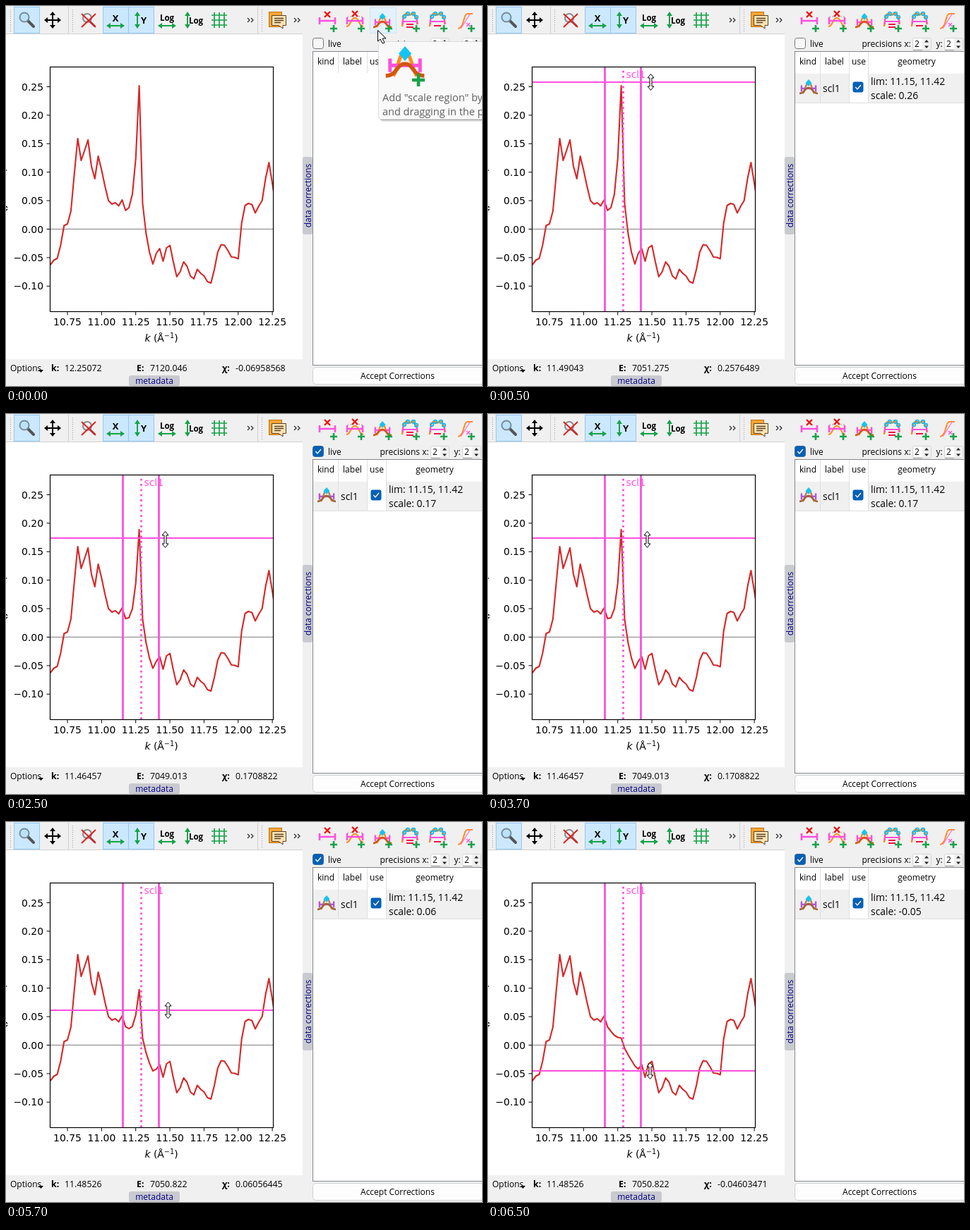
Animation, 674 px wide and 539 px high, one loop 8 s. Source, as an HTML page:

```html
<!DOCTYPE html>
<html>
<head>
<meta charset="utf-8">
<style>
  html, body { margin: 0; width: 100%; height: 100%; overflow: hidden; background: #f0f0f0; }
  svg { display: block; width: 674px; height: 539px; --bar: #ff50dc; --arch: #ff8c1a; --hump: #d2560f; }
  text { font-family: "Open Sans", sans-serif; white-space: pre; }
  .ui { font-size: 12px; }
  .status { font-size: 12.3px; }
  .big { font-size: 13.9px; }
  .tip { font-size: 14.5px; }
  .axis, .axis text { font-family: "DejaVu Sans", sans-serif; font-size: 13.9px; }
  .line { fill: none; }
  .muted { --bar: #b055d8; --arch: #c08048; --hump: #a5622f; }
</style>
</head>
<body>
<svg viewBox="0 0 674 539">
  <defs>
    <clipPath id="axes"><rect x="62" y="86" width="316" height="347"/></clipPath>
    <path id="plus" d="M-5 0H5M0 -5V5" stroke="#17a34a" stroke-width="2.6"/>
    <path id="cross" d="M-4 -4L4 4M4 -4L-4 4" stroke="#f01010" stroke-width="2.4"/>
    <path id="span" d="M-11 -5V5M11 -5V5M-11 0H11" stroke="var(--bar)" stroke-width="2.6"/>
    <g id="peak" class="line">
      <path d="M-8 9C-5 6 -4 -7 0 -7C4 -7 5 6 8 9" stroke="var(--arch)" stroke-width="2.4"/>
      <use href="#span" transform="translate(0 2) scale(.92)"/>
      <path d="M-13 9C-5 9 -6 1 0 1C6 1 5 9 13 9" stroke="var(--hump)" stroke-width="2.6"/>
      <path d="M0 -11L4.3 -6L0 -1L-4.3 -6Z" fill="#12c4f5"/>
    </g>
    <g id="arcs" class="line">
      <path d="M-11 10C-10 -4 -8 -9 -4 -8C-1 -7 0 -5 1 -7C4 -11 9 -8 11 7" stroke="#ff8c1a" stroke-width="2.4"/>
      <path d="M-10 -1V7M10 -1V7M-10 3H10" stroke="#ff50dc" stroke-width="2"/>
      <g stroke="#12b8ee" stroke-width="1.7">
        <circle cx="-8" cy="-4" r="2.3"/><circle cx="-3" cy="-8" r="2.3"/>
        <circle cx="5" cy="-8" r="2.3"/><circle cx="9" cy="-3" r="2.3"/>
      </g>
    </g>
    <path id="chev" class="line" d="M-4 -3L-1 0L-4 3M1 -3L4 0L1 3" stroke="#222" stroke-width="1.1"/>
    <g id="spin">
      <rect x=".5" y=".5" width="26" height="17" rx="2" fill="#fff" stroke="#d5d5d5"/>
      <rect x="14" y="1" width="12" height="16" fill="#f0f0f0"/>
      <path d="M1 17.5H14" stroke="#888"/>
      <path d="M17 6.5L20 3L23 6.5ZM17 11.5L20 15L23 11.5Z" fill="#222"/>
      <text class="ui" x="3" y="13">2</text>
    </g>
    <g id="tick">
      <rect x="-7.5" y="-7.5" width="15" height="15" rx="3" fill="#0560b6"/>
      <path class="line" d="M-3.7 0L-1 3L4 -3" stroke="#fff" stroke-width="1.3"/>
    </g>
  </defs>

  <!-- plot toolbar -->
  <rect width="420" height="501" fill="#fff"/>
  <rect width="420" height="40" fill="#f0f0f0"/>
  <path d="M0 39.5H420M88.5 1V39M356.5 1V39" stroke="#d0d0d0"/>
  <path d="M6.5 5V36M94.5 5V36M362.5 5V36" stroke="#999" stroke-dasharray="1 2"/>
  <g fill="#cce8ff" stroke="#90c8f6">
    <rect x="11.5" y="1.5" width="36" height="37"/>
    <rect x="137.5" y="1.5" width="36" height="37"/>
    <rect x="173.5" y="1.5" width="36" height="37"/>
  </g>
  <path d="M30 20L39 29" stroke="#555" stroke-width="4" stroke-linecap="round"/>
  <circle cx="26" cy="16" r="6.5" fill="#b9e2fb" stroke="#7b8b98" stroke-width="2"/>
  <path d="M56 20H76M66 10V30" stroke="#000" stroke-width="2"/>
  <path d="M54 20L59 16V24ZM78 20L73 16V24ZM66 8L62 13H70ZM66 32L62 27H70Z"/>
  <circle cx="115" cy="17" r="6" fill="#eef5fa" stroke="#888" stroke-width="2"/>
  <path d="M119 22L126 29" stroke="#666" stroke-width="3"/>
  <path d="M107 11L127 30M127 11L107 30" stroke="#e02020" stroke-width="2"/>
  <g stroke="#17a34a" stroke-width="2" fill="#17a34a">
    <path d="M146 28H164M186 13V27M219 28H237M257 13V27"/>
    <g stroke="none">
      <path d="M142 28L148 24V32ZM168 28L162 24V32ZM186 8L182 14H190ZM186 32L182 26H190Z"/>
      <path d="M215 28L221 24V32ZM241 28L235 24V32ZM257 8L253 14H261ZM257 32L253 26H261Z"/>
    </g>
    <path d="M291 13H313M291 20H313M291 27H313M295 9V31M302 9V31M309 9V31" stroke-width="1.7"/>
  </g>
  <g font-weight="700" text-anchor="middle">
    <text x="155" y="22" font-size="13">X</text>
    <text x="195" y="25" font-size="13">Y</text>
    <text x="228" y="21" font-size="11.5">Log</text>
    <text x="269" y="25" font-size="11.5">Log</text>
  </g>
  <use href="#chev" x="346" y="20"/>
  <use href="#chev" x="412" y="20"/>
  <rect x="372.5" y="8.5" width="18" height="21" fill="#f7a531" stroke="#c07418"/>
  <path d="M376.5 13.5H396.5V27.5H392V32L386 27.5H376.5Z" fill="#fde2b4" stroke="#5a4228"/>
  <path d="M380 17.5H393M380 20.5H393M380 23.5H389" stroke="#5a4228" stroke-width="1.3"/>

  <!-- chart -->
  <g clip-path="url(#axes)">
    <path d="M62 316.5H378" stroke="#a0a0a0" stroke-width="1.4"/>
    <polyline id="curve" class="line" stroke="#d62728" stroke-width="2.1" stroke-linejoin="round"/>
    <g class="roi" stroke="#ff50dc">
      <path d="M165.5 86V433M216.5 86V433" stroke-width="2.8"/>
      <path d="M191.5 433V86" stroke-width="2.8" stroke-dasharray="2.78 4.58"/>
      <path id="level" d="M62 0H378" stroke-width="2.1"/>
      <text class="axis" x="195.5" y="102" fill="#ff50dc" stroke="none">scl1</text>
    </g>
  </g>
  <rect x="62.5" y="86.5" width="316" height="347" class="line" stroke="#000" stroke-width="1.2"/>
  <g id="ticks" class="axis"></g>
  <text class="axis" x="220" y="476" text-anchor="middle"><tspan font-style="italic">k</tspan> (Å<tspan font-size="9.7" dy="-5">−1</tspan><tspan dy="5">)</tspan></text>
  <path d="M0 233H1M0 284L2 286M0 290L2 288" stroke="#000" stroke-width="1.3"/>

  <!-- status -->
  <text class="ui" x="6" y="518">Options</text>
  <path d="M46 516H53L49.5 520Z"/>
  <g class="status">
    <g font-weight="700">
      <text x="64" y="518">k:</text><text x="185" y="518">E:</text><text x="306" y="518">χ:</text>
    </g>
    <text id="k" x="83" y="518"/><text id="E" x="204" y="518"/><text id="chi" x="325" y="518"/>
  </g>
  <rect x="174" y="524" width="72" height="15" rx="3" fill="#c9c9d0"/>
  <text class="ui" x="210" y="536" text-anchor="middle" fill="#000080">metadata</text>
  <rect x="420" y="214" width="14" height="110" rx="3" fill="#c9c9d0"/>
  <text class="ui" transform="translate(432 269) rotate(-90)" text-anchor="middle" fill="#000080">data corrections</text>

  <!-- corrections panel -->
  <rect class="hover" x="515.5" y="2.5" width="37" height="36" fill="#e3f1fb" stroke="#cbe5f8"/>
  <use href="#span" x="455" y="21"/><use href="#cross" x="455" y="12"/>
  <path class="line" d="M482 29C489 29 487 17 494 17C501 17 499 29 506 29" stroke="#ff8c1a" stroke-width="2"/>
  <path d="M483 15H505" stroke="#999" stroke-dasharray="2 2"/>
  <use href="#span" x="494" y="21"/><use href="#cross" x="494" y="11"/>
  <use href="#peak" x="533" y="21"/>
  <use href="#arcs" x="572" y="19"/>
  <path d="M567 26H577M567 30H577" stroke="#f01040" stroke-width="2"/>
  <use href="#arcs" x="611" y="19"/>
  <path d="M606 28H616" stroke="#f01040" stroke-width="2"/>
  <path class="line" d="M640 32C650 30 647 12 653 11L661 11" stroke="#ff8c1a" stroke-width="2"/>
  <path d="M644 32L658 10" stroke="#ff70dc" stroke-width="1.3"/>
  <path d="M652 24L657 29M657 24L652 29" stroke="#ff50dc" stroke-width="1.3"/>
  <g id="pluses"></g>

  <rect x="434.5" y="45.5" width="15" height="15" rx="3" fill="#f7f7f7" stroke="#777"/>
  <use id="live" href="#tick" x="442" y="53"/>
  <g class="ui">
    <text x="456" y="58">live</text>
    <text x="529.5" y="58">precisions x:</text>
    <text x="634.5" y="58">y:</text>
  </g>
  <use href="#spin" x="601" y="45"/><use href="#spin" x="646" y="45"/>

  <rect x="434.5" y="64.5" width="246" height="445" fill="#fff" stroke="#828790"/>
  <path d="M470.5 65V95M511.5 65V95M538.5 65V95" stroke="#e0e0e0"/>
  <g class="ui" text-anchor="middle">
    <text x="453" y="83">kind</text><text x="490.5" y="83">label</text>
    <text x="525" y="83">use</text><text x="607" y="83">geometry</text>
  </g>
  <g class="roi">
    <path d="M435 96H511V137H435ZM539 96H674V137H539Z" fill="#f0f0f0"/>
    <path d="M435 137.5H674M470.5 95V137M511.5 95V137M538.5 95V137" stroke="#dedede"/>
    <use class="muted" href="#peak" x="454" y="115"/>
    <use href="#tick" x="524" y="115"/>
    <g class="big">
      <text x="474" y="122">scl1</text>
      <text x="542" y="112">lim: 11.15, 11.42</text>
      <text id="scale" x="542" y="132"/>
    </g>
  </g>
  <rect x="434.5" y="512.5" width="246" height="24" rx="4" fill="#fdfdfd" stroke="#d0d0d0"/>
  <text class="ui" x="554.5" y="529" text-anchor="middle">Accept Corrections</text>

  <g class="hover">
    <rect x="530" y="53" width="150" height="111" rx="4" fill="#000" opacity=".12"/>
    <rect x="529" y="52" width="150" height="110" rx="4" fill="#000" opacity=".25"/>
    <rect x="527.5" y="50.5" width="160" height="110" rx="4" fill="#f9f9f9" stroke="#dcdcdc"/>
    <use href="#peak" transform="translate(565 80) scale(2.1)"/>
    <use href="#plus" transform="translate(584 105) scale(1.8)"/>
    <g class="tip" fill="#606060">
      <text x="533" y="135">Add "scale region" by clicking</text>
      <text x="533" y="155">and dragging in the plot</text>
    </g>
    <path d="M526.5 34.5V50L530 47L533 53L536 52L533 46H538Z" fill="#fff" stroke="#000"/>
  </g>
  <path id="resize" class="roi" d="M0 -11.5L4.5 -6H1.5V6H4.5L0 11.5L-4.5 6H-1.5V-6H-4.5Z" fill="#fff" stroke="#000"/>
</svg>

<script>
const $ = id => document.getElementById(id);

// curve heights, one every 0.025 of k; the middle run is rescaled between its two ends
const before = [367, 360.5, 358, 339, 311.5, 309, 291, 238, 188, 219, 205, 190, 227, 245, 213, 233,
  256, 276, 281, 279, 283.5, 275];
const full = [290, 286, 267, 216, 113, 280, 322, 349, 366, 351];
const flat = [290.5, 297, 302.5, 305.5, 306.5, 321, 330, 338, 346, 350.5];
const after = [344, 362, 343, 339.5, 363, 384, 377, 363, 369, 383, 387, 373.5, 379, 383, 391, 393,
  374, 349, 338.5, 339.5, 347, 356, 356.5, 358.5, 308, 283, 280, 281.5, 293.5, 284, 276, 245, 222, 252, 282];

const states = [
  { start: 0, k: '12.25072', E: '7120.046', chi: '-0.06958568', f: 1, hover: true },
  { start: 500, k: '11.49043', E: '7051.275', chi: '0.2576489', f: 1, scale: '0.26', level: 108, x: 230.5, y: 108 },
  { start: 2500, k: '11.46457', E: '7049.013', chi: '0.1708822', f: .737, scale: '0.17', level: 176, x: 225.5, y: 178, live: true },
  { start: 4500, k: '11.48526', E: '7050.822', chi: '0.06056445', f: .356, scale: '0.06', level: 267, x: 229.5, y: 267, live: true },
  { start: 6500, k: '11.48526', E: '7050.822', chi: '-0.04603471', f: 0, scale: '-0.05', level: 353, x: 229.5, y: 353, live: true }
];

let marks = '';
for (let i = 0; i < 7; i++) {
  const x = 87 + i * 48.35;
  marks += `<path d="M${x} 434v4.5" stroke="#000"/><text x="${x}" y="453" text-anchor="middle">${(10.75 + i / 4).toFixed(2)}</text>`;
}
for (let i = -2; i < 6; i++) {
  const y = 316.5 - i * 40.4;
  marks += `<path d="M57.5 ${y}h4.5" stroke="#000"/><text x="53" y="${y + 5}" text-anchor="end">${(i / 20).toFixed(2).replace('-', '−')}</text>`;
}
$('ticks').innerHTML = marks;
$('pluses').innerHTML = [464, 503, 542, 581, 620, 659].map(x => `<use href="#plus" x="${x}" y="32"/>`).join('');

const show = (name, on) => document.querySelectorAll('.' + name)
  .forEach(el => el.style.display = on ? '' : 'none');

function draw(s) {
  const middle = flat.map((y, i) => y + (full[i] - y) * s.f);
  $('curve').setAttribute('points', [...before, ...middle, ...after]
    .map((y, i) => `${62.9 + i * 4.835},${y}`).join(' '));
  for (const id of ['k', 'E', 'chi']) $(id).textContent = s[id];
  $('live').style.display = s.live ? '' : 'none';
  show('hover', s.hover);
  show('roi', !s.hover);
  if (s.hover) return;
  $('scale').textContent = 'scale: ' + s.scale;
  $('level').setAttribute('transform', `translate(0 ${s.level})`);
  $('resize').setAttribute('transform', `translate(${s.x} ${s.y})`);
}

let current;
function frame(now) {
  const t = now % 8000;
  const next = states.findLast(s => t >= s.start);
  if (next !== current) draw(current = next);
  requestAnimationFrame(frame);
}
frame(0);
</script>
</body>
</html>
```
